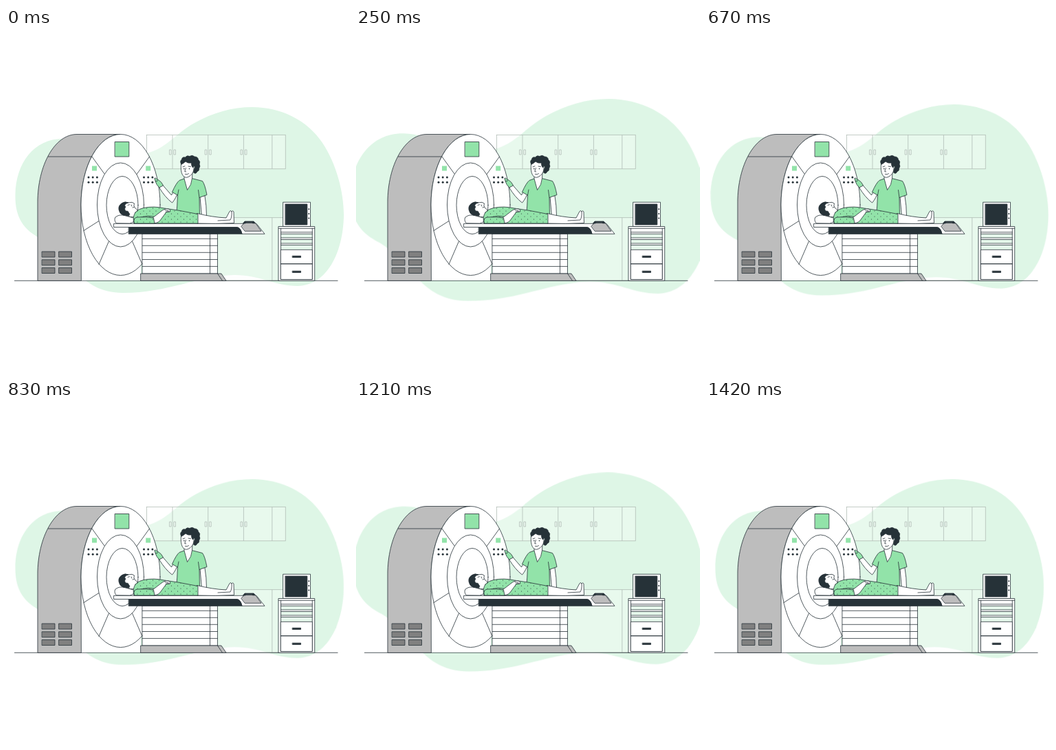
An HTML page without scripts that plays this animation: 500 px wide and 500 px high, repeating every 1540 ms.

```html
<!DOCTYPE html>
<html lang="en">
<head>
<meta charset="utf-8">
<title>Scanner room</title>
<style>
  html, body { margin: 0; width: 100%; height: 100%; overflow: hidden; background: #fff; }
  svg { display: block; width: 100%; height: 100%; }
  .line { fill: none; }
  .ink { fill: #263238; }
  .grey { fill: #bdbdbd; }
  .green { fill: #92e3a9; }
  .white { fill: #fff; }
  .bare { stroke: none; }
  .outlined { stroke: #263238; stroke-width: .8; stroke-linejoin: round; stroke-linecap: round; }
  .faint { fill: #fff; fill-opacity: .3; stroke: #a9b5ae; stroke-width: .7; }
  .blob {
    fill: #def6e6;
    transform-origin: 252px 250px;
    animation: beat 1540ms -4ms infinite;
  }
  /* Two beats on a 37-step timeline: 1 step = 2.7027% */
  @keyframes beat {
    0% { transform: scale(1); animation-timing-function: steps(6); }
    16.216% { transform: scale(1.088); animation-timing-function: steps(1); }
    18.919% { transform: scale(1.091); animation-timing-function: steps(13); }
    54.054% { transform: scale(1); }
    56.757% { transform: scale(1); animation-timing-function: steps(6); }
    72.973% { transform: scale(1.086); }
    75.676% { transform: scale(1.086); animation-timing-function: steps(6); }
    91.892%, 100% { transform: scale(1); }
  }
</style>
</head>
<body>
<svg viewBox="0 0 500 500">
  <defs>
    <pattern id="gown" width="9" height="8" patternUnits="userSpaceOnUse">
      <rect class="green" width="9" height="8"/>
      <circle class="ink" cx="2" cy="2" r=".6"/>
      <circle class="ink" cx="6.5" cy="6" r=".6"/>
    </pattern>
    <g id="vents">
      <rect x="52.5" y="325" width="18.5" height="8"/>
      <rect x="77" y="325" width="18.5" height="8"/>
    </g>
    <g id="dots">
      <circle r="1.5"/><circle cx="6.2" r="1.5"/><circle cx="12.4" r="1.5"/>
      <circle cy="7.2" r="1.5"/><circle cx="6.2" cy="7.2" r="1.5"/><circle cx="12.4" cy="7.2" r="1.5"/>
    </g>
    <path id="handles" d="M-4.5 177h2.5v7h-2.5zM2 177h2.5v7H2z"/>
  </defs>

  <path class="blob" d="M13.5 243C14 195 42 160 84 161C126 162 150 190 185 186C232 181 240 157 274 138C301 123 328 115 358 115C400 115 438 134 460 167C480 197 491 238 491 272C490 328 466 374 424 375C390 375 370 359 332 359C279 360 236 385 170 385C105 384 98 335 52 307C26 294 13 276 13.5 243Z"/>

  <g class="faint">
    <rect x="204.5" y="155.3" width="201.7" height="49.5"/>
    <path class="line" d="M242 155.3v49.5M293.7 155.3v49.5M345.4 155.3v49.5M386.8 155.3v49.5"/>
    <use href="#handles" x="242"/>
    <use href="#handles" x="293.7"/>
    <use href="#handles" x="345.4"/>
    <path d="M305 275.6h99V367h-99zM386.8 275.6V367"/>
  </g>

  <g class="outlined">
    <path class="line" d="M12.5 367.3H482"/>

    <g id="scanner">
      <path class="bare white" d="M109 257h87v109.8h-87z"/>
      <path class="grey" d="M109 367.3H46V254C46 199 71 154.5 103 154.5H166.5C135 154.5 109 200 109 257Z"/>
      <path class="line" d="M61.5 187H125"/>
      <g fill="#808080">
        <use href="#vents"/><use href="#vents" y="11.8"/><use href="#vents" y="23.5"/>
      </g>
      <ellipse class="white" cx="166.5" cy="257" rx="57.5" ry="102.5"/>
      <path class="line" d="M125 187l19.500 27M208.500 187l-19.500 27M113 294.500l22-14M135 343.500l14.500-33.500M198 343.500l-14.500-33.500"/>
      <ellipse class="white" cx="166.500" cy="257" rx="34" ry="61"/>
      <ellipse class="white" cx="169" cy="257.500" rx="23" ry="42"/>
      <rect class="green" x="158.500" y="165.500" width="20.300" height="21.500"/>
      <path class="bare green" d="M125 200.500h7v7h-7zM203.200 200.500h7v7h-7z"/>
      <g class="bare ink">
        <use href="#dots" x="120" y="217"/><use href="#dots" x="200.500" y="217"/>
      </g>
    </g>

    <g id="operator">
      <path class="white" d="M282 245L284.500 274H291.500Q291.500 258 289 244Z"/>
      <path class="white" d="M247 231L240.500 243L227.500 228L222.500 231.500Q231 246 241.500 254Q247 248 251 236Z"/>
      <path class="green" d="M222.500 231.800Q218 227 217.300 223L215.800 218.500Q217.200 217 219 219.500L222.500 221.500Q226 223.500 228.300 228.500Z"/>
      <path class="line" d="M217.300 223l3.200-1"/>
      <path class="green" d="M259 219L252 221.500Q247.500 225 241.500 238.500L249.500 243Q249 258 247.500 273.500H281.500L281 246.500L292 242.500Q289 227 285.500 222.500L270 218.500Z"/>
      <path class="white" d="M259 212V219L263.500 235.500Q270 228 270.500 218.500L271 210Z"/>
      <path class="line" d="M249.500 243l1.500-8M281 246.500l-1.500-11"/>
      <path class="white" d="M254.500 197Q253.500 208 256.500 213.500Q260 219 265 216.500Q272 213 273 205V194Q263 189 254.500 197Z"/>
      <path class="ink" d="M255 198Q252 194 255.500 191Q256 187 260.500 188Q263 184.500 267 186.500Q271 184 274 187Q279 187 279.500 191.500Q283 194 281 198Q283 201 280.500 204Q281 208 278 208.500Q276 213 272.500 210L273.500 205Q276 201 273 200.500L271.500 203Q269 200 269.500 196Q264 197 261 194Q258 197 255 198Z"/>
      <path class="line" d="M257 201.800l3-1M265 201l3.500 .6M261.500 203.500l-1.800 5 2 .5M260.500 212.500q3 1 5-.8"/>
      <circle class="bare ink" cx="258.800" cy="204.500" r=".85"/>
      <circle class="bare ink" cx="266.500" cy="204.500" r=".85"/>
    </g>

    <g id="table">
      <path class="white" d="M198.300 299H307.500V357H198.300Z"/>
      <path class="line" d="M198.300 306.300h109.200M198.300 316.300h109.200M198.300 326.300h109.200M198.300 336.500h109.200M198.300 346.600h109.200M296.500 299v58"/>
      <path class="grey" d="M196 357H313L320 367.300H196ZM307.500 357l7 10.300"/>
      <path class="white" d="M157 284.300H364L376 299.300H343Q341 290 336 289.500H157Z"/>
      <path class="ink" d="M178.500 289.800H336Q341 290.500 343 299.300H178.500Z"/>
      <path class="grey" d="M342 288L346.500 283.500H362.500L371 295.300H347.500Z"/>
      <path class="ink" d="M344.500 283.800L347 281H360L362.500 283.800H358.500L357.500 282.600H349L348 283.800Z"/>
    </g>

    <g id="patient">
      <path class="white" d="M160 283.500Q156.500 279 159 275Q165 270 174 273L187 276.500Q187 283 180 284Z"/>
      <path class="white" d="M278 269.500Q300 275 320 276L325 266.500Q327 264.300 328 267Q329.500 264.300 331 267L331.500 283.500Q304 285 278 284Z"/>
      <path class="line" d="M328 267Q328.500 275 326 279L308 280"/>
      <path class="white" d="M168 259Q172 253.500 177 254L183 253.300 186.500 255Q185 258 187 261L191 264.500L188 275Q180 275 175 272.500Q167 268 168 259Z"/>
      <path class="ink" d="M177.500 253.800Q173 251.500 168.500 254.500Q163 258 164 264Q165 270 170 272L178.500 273Q181 270.500 178.500 268.500Q178 265.500 174.500 266Q171 263.500 174 260Q170 257 177.500 253.800Z"/>
      <path class="line" d="M177 257.500l2.500-.8M182 257l.8 2M184 261l1.800-.5"/>
      <path fill="url(#gown)" d="M188 268Q193 262.500 200 261.500Q215 258.500 230 262L250 265L279 270.500V284H186Q183.500 275 188 268Z"/>
      <path class="line" d="M196 275Q206 272 215 274"/>
      <path class="white" d="M213 276L228 264.500Q233 261.500 236 263Q240 264 238.500 267L233 267.500L226 277Q222 284 215 283.700Z"/>
      <path class="line" d="M231 264.500l5 1M232 267.300l5-.5"/>
      <path fill="url(#gown)" d="M186 281Q185 276 191 275Q203 274 214.500 276L216 284H187Z"/>
    </g>

    <g id="cart">
      <rect class="white" x="403" y="253.200" width="39.500" height="35.300"/>
      <rect class="ink" x="406.200" y="256" width="31.600" height="30"/>
      <g class="bare ink">
        <circle cx="440.200" cy="263.300" r="1"/><circle cx="440.200" cy="270" r="1"/><circle cx="440.200" cy="276.500" r="1"/>
      </g>
      <path class="white" d="M396.300 288.500h52.400v78.800h-52.400z"/>
      <path class="bare" fill="#e5f8eb" d="M399.500 299.300h45.700v5.700h-45.700zM399.500 307.500h45.700v5.500h-45.700zM399.500 315.500h45.700v6.800h-45.700z"/>
      <path class="line" d="M396.300 291.300h52.400M399.500 291.300v74.200h45.700v-74.200M399.500 296.800h45.700M399.500 299.300h45.700M399.500 305h45.700M399.500 307.500h45.700M399.500 313h45.700M399.500 315.500h45.700"/>
      <path class="white" d="M399.500 322.300h45.700v20.500h-45.700zM399.500 342.800h45.700v22.700h-45.700z"/>
      <path class="ink" d="M416.500 331.300h12v2.200h-12zM416.500 353.200h12v2.200h-12z"/>
    </g>
  </g>
</svg>
</body>
</html>
```
